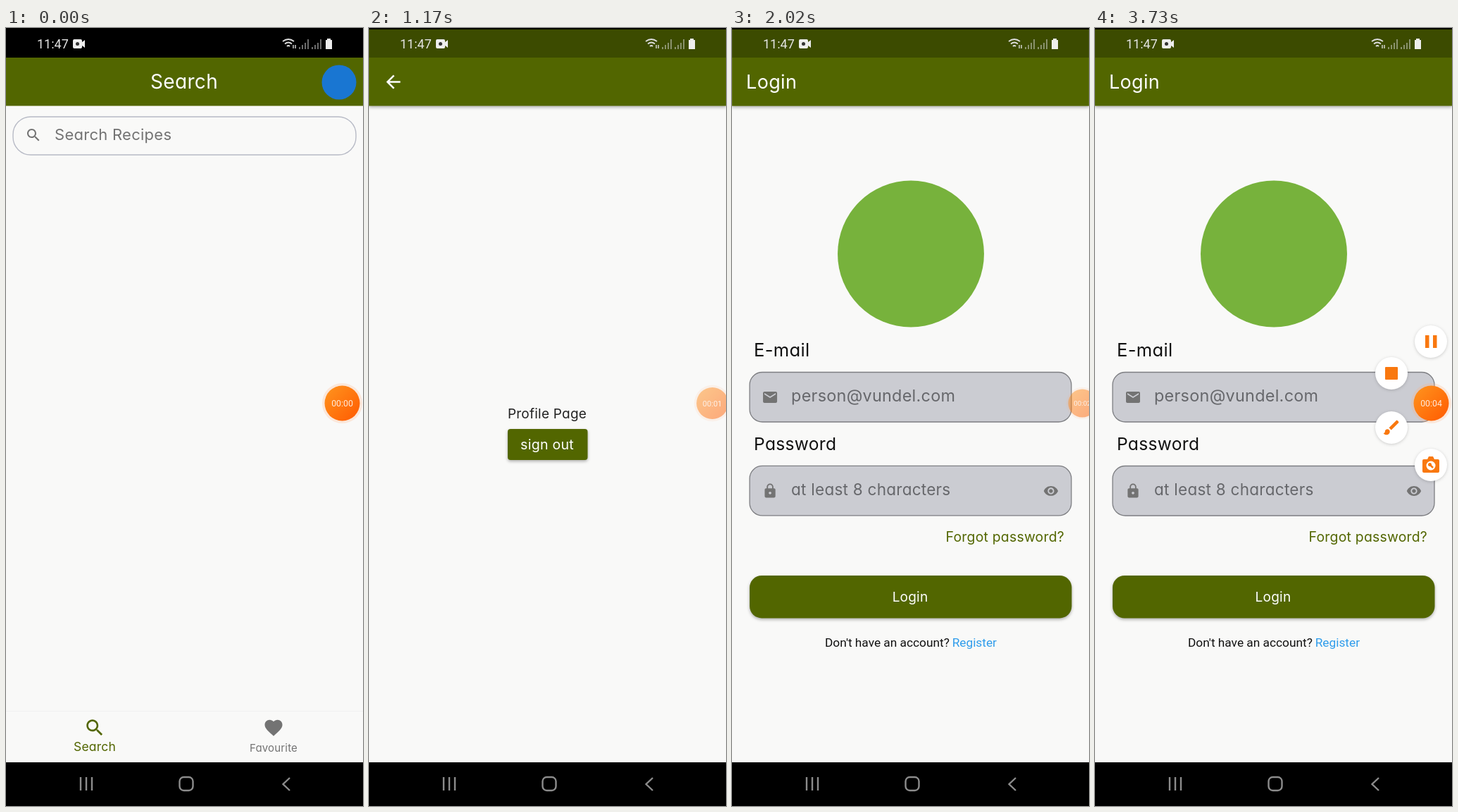
Recreate the animation shown at these times as an HTML page. Size 507 px wide and 1104 px high, loop 3840 ms.

```html
<!DOCTYPE html>
<html lang="en">
<head>
<meta charset="utf-8">
<title>Recipe app sign-out</title>
<style>
html, body { margin: 0; width: 100%; height: 100%; overflow: hidden; background: #000; }
svg { display: block; width: 100vw; height: 100vh; }
text { font-family: Inter, "Open Sans", sans-serif; font-feature-settings: "cv11"; letter-spacing: .012em; }
.sys { font-family: Roboto, Arial, sans-serif; letter-spacing: 0; }
.raised { filter: drop-shadow(0 2px 2px rgba(0, 0, 0, .3)); }
.float { filter: drop-shadow(0 1px 2px rgba(0, 0, 0, .18)); }
</style>
</head>
<body>
<script>
const LOOP = 3840, OLIVE = '#526600', PAGE = '#f9f9f8', GREY = '#737373';
const CX = 253.5, CY = 521;

const PATHS = {
  search: 'M15.5 14h-.79l-.28-.27C15.41 12.59 16 11.11 16 9.5 16 5.91 13.09 3 9.5 3S3 5.91 3 9.5 5.91 16 9.5 16c1.61 0 3.09-.59 4.23-1.57l.27.28v.79l5 4.99L20.49 19l-4.99-5zm-6 0C7.01 14 5 11.99 5 9.5S7.01 5 9.5 5 14 7.01 14 9.5 11.99 14 9.5 14z',
  heart: 'M12 21.35l-1.45-1.32C5.4 15.36 2 12.28 2 8.5 2 5.42 4.42 3 7.5 3c1.74 0 3.41.81 4.5 2.09C13.09 3.81 14.76 3 16.5 3 19.58 3 22 5.42 22 8.5c0 3.78-3.4 6.86-8.55 11.54z',
  mail: 'M20 4H4c-1.1 0-2 .9-2 2v12c0 1.1.9 2 2 2h16c1.1 0 2-.9 2-2V6c0-1.1-.9-2-2-2zm0 4l-8 5-8-5V6l8 5 8-5z',
  lock: 'M18 8h-1V6c0-2.76-2.24-5-5-5S7 3.24 7 6v2H6c-1.1 0-2 .9-2 2v10c0 1.1.9 2 2 2h12c1.1 0 2-.9 2-2V10c0-1.1-.9-2-2-2zm-6 9c-1.1 0-2-.9-2-2s.9-2 2-2 2 .9 2 2-.9 2-2 2zm3.1-9H8.9V6c0-1.71 1.39-3.1 3.1-3.1s3.1 1.39 3.1 3.1z',
  eye: 'M12 4.5C7 4.5 2.73 7.61 1 12c1.73 4.39 6 7.5 11 7.5s9.27-3.11 11-7.5c-1.73-4.39-6-7.5-11-7.5zM12 17c-2.76 0-5-2.24-5-5s2.24-5 5-5 5 2.24 5 5-2.24 5-5 5zm0-8c-1.66 0-3 1.34-3 3s1.34 3 3 3 3-1.34 3-3-1.34-3-3-3z',
  back: 'M20 11H7.83l5.59-5.59L12 4l-8 8 8 8 1.41-1.41L7.83 13H20z',
  brush: 'M7 14c-1.66 0-3 1.34-3 3 0 1.31-1.16 2-2 2 .92 1.22 2.49 2 4 2 2.21 0 4-1.79 4-4 0-1.66-1.34-3-3-3zm13.71-9.37l-1.34-1.34a1 1 0 0 0-1.41 0L9 12.25 11.75 15l8.96-8.96a1 1 0 0 0 0-1.41z'
};

const icon = (name, x, y, size, fill = GREY, extra = '') =>
  `<path d="${PATHS[name]}" fill="${fill}" transform="translate(${x} ${y}) scale(${size}) translate(-12 -12)" ${extra}/>`;
const text = (s, x, y, size, fill, anchor = 'start', extra = '') =>
  `<text x="${x}" y="${y}" font-size="${size}" fill="${fill}" text-anchor="${anchor}" ${extra}>${s}</text>`;
const rect = (x, y, w, h, fill, extra = '') =>
  `<rect x="${x}" y="${y}" width="${w}" height="${h}" fill="${fill}" ${extra}/>`;
const circle = (x, y, r, fill, extra = '') =>
  `<circle cx="${x}" cy="${y}" r="${r}" fill="${fill}" ${extra}/>`;
const header = () => rect(0, 0, 507, 110.5, OLIVE, 'class="raised"');
const field = y => rect(25, y, 457, 70.5, '#cbccd2', 'rx="18" stroke="#7d7e82" stroke-width="1.3"');
const signal = x => `<path d="M${x} 30v-3M${x + 4} 30v-6M${x + 8} 30v-9M${x + 12} 30V16"/>`;

const searchPage = `
  ${rect(0, 0, 507, 1042, PAGE)}
  ${rect(0, 0, 507, 42, '#000')}
  ${rect(0, 42, 507, 68.5, OLIVE)}
  ${rect(447, 42, 60, 68.5, '#fff', 'id="press" opacity=".1"')}
  ${text('Search', 253, 86, 28, '#fff', 'middle')}
  ${circle(473, 77, 24.5, '#1976d2')}
  ${rect(10, 126, 487, 54, PAGE, 'rx="25" stroke="#b8bbc6" stroke-width="1.4"')}
  ${icon('search', 39, 152, 1)}
  ${text('Search Recipes', 69, 159, 22, GREY)}
  ${rect(0, 969, 507, 1, '#f1f1f1')}
  ${icon('search', 126, 993, 1.3, OLIVE)}
  ${text('Search', 126, 1026, 17.5, OLIVE, 'middle')}
  ${icon('heart', 380, 993, 1.25)}
  ${text('Favourite', 380, 1027, 15, GREY, 'middle')}`;

const profilePage = `
  ${rect(0, 0, 507, 1042, PAGE)}
  ${header()}
  ${icon('back', 34.5, 76.5, 1.25, '#fff', 'id="back"')}
  ${text('Profile Page', 253, 554, 19, '#222', 'middle')}
  ${rect(197, 569, 113.5, 44, OLIVE, 'rx="4" class="raised"')}
  <g clip-path="url(#button)">${circle(275, 592, 0, '#fff', 'id="ripple" opacity=".14"')}</g>
  ${text('sign out', 253, 598, 19.6, '#fff', 'middle')}`;

const loginPage = `
  ${rect(0, 0, 507, 1042, PAGE)}
  ${header()}
  ${text('Login', 20, 86, 27, '#fff')}
  ${circle(254, 320.5, 104, '#77b23c')}
  ${text('E-mail', 31, 466, 25.6, '#111')}
  ${field(488.5)}
  ${icon('mail', 54, 524, 1)}
  ${text('person@vundel.com', 84, 530, 23.4, '#66676b')}
  ${text('Password', 31, 599, 24.6, '#111')}
  ${field(621.5)}
  ${icon('lock', 54, 657, .95)}
  ${text('at least 8 characters', 84, 663, 22.5, '#66676b')}
  ${icon('eye', 453, 657, .92)}
  ${text('Forgot password?', 472, 729, 19.4, OLIVE, 'end')}
  ${rect(25, 777, 457.5, 60.5, OLIVE, 'rx="17" class="raised"')}
  ${text('Login', 253, 814, 19, '#fff', 'middle')}
  ${text("Don't have an account?", 132, 878, 17.3, '#111', 'start', 'class="sys"')}
  ${text('Register', 376, 878, 17.3, '#2f9ceb', 'end', 'class="sys"')}`;

const statusBar = `
  ${rect(0, 0, 507, 42, '#000', 'opacity=".27"')}
  ${rect(0, 0, 507, 2, '#000')}
  ${text('11:47', 44, 29, 18, '#e6e6e6', 'start', 'class="sys"')}
  <path d="M97 16h9q2 0 2 2v2l4-3v11l-4-3v2q0 2-2 2h-9q-2 0-2-2v-9q0-2 2-2z" fill="#eee"/>
  ${circle(101.5, 22.5, 2.5, '#333')}
  <g fill="none" stroke="#ddd" stroke-width="1.8">
    <path d="M393 19q8-6 16 0M396 22.5q5-4 10 0M399 26q2-2 4 0"/>
    <path d="M408 24v5M411 24v5" stroke-width="1.4"/>
    <g stroke-width="1.5" opacity=".65">${signal(417)}${signal(435)}</g>
  </g>
  <path d="M456 15h5v2h2v13h-9V17h2z" fill="#eee"/>`;

const navBar = `
  ${rect(0, 1042, 507, 62, '#000')}
  <g fill="none" stroke="#8c8c8c" stroke-width="2.4">
    <path d="M106 1063v19M114 1063v19M122 1063v19M403 1064l-9.500 9 9.500 9"/>
    <rect x="246.500" y="1063" width="19" height="19" rx="6"/>
  </g>`;

// Recorder menu buttons: position and glyph around its own centre
const ORANGE = '#f9780f';
const menu = [
  [477, 445, rect(-8, -9, 5.5, 18, ORANGE) + rect(3, -9, 5.5, 18, ORANGE)],
  [421, 490, rect(-9, -9, 18, 18, ORANGE, 'rx="1"')],
  [421, 567, icon('brush', 0, 0, 1.15, ORANGE)],
  [477, 620, `<path d="M-10-8h5l2-4h6l2 4h5q2 0 2 2V9q0 2-2 2h-20q-2 0-2-2V-6q0-2 2-2z" fill="${ORANGE}"/>
    ${circle(0, 1, 6.5, '#fff')}<path d="M-1 0l4 4" stroke="${ORANGE}" stroke-width="2.500"/>${circle(-1.5, -.5, 2.5, ORANGE)}`]
];

document.body.innerHTML = `<svg viewBox="0 0 507 1104" preserveAspectRatio="none">
  <defs>
    <linearGradient id="fire" x2="1" y2="1"><stop stop-color="#ff951f"/><stop offset="1" stop-color="#ff5a00"/></linearGradient>
    <clipPath id="button"><rect x="197" y="569" width="113.5" height="44" rx="4"/></clipPath>
  </defs>
  <g id="search">${searchPage}</g>
  <g id="profile">${profilePage}</g>
  <g id="login">${loginPage}</g>
  ${statusBar}${navBar}
  ${menu.map(m => `<g class="item">${circle(0, 0, 23, '#fff', 'class="float"')}${m[2]}</g>`).join('')}
  <g id="bubble">
    ${circle(0, 0, 28.5, '#ffb080', 'opacity=".25"')}
    ${circle(0, 0, 25, 'url(#fire)')}
    ${text('00:00', 0, 4.5, 12.3, '#ffe9da', 'middle', 'class="sys" id="clock"')}
  </g>
</svg>`;

const $ = id => document.getElementById(id);
const items = [...document.querySelectorAll('.item')];
const ramp = (t, a, b) => Math.min(1, Math.max(0, (t - a) / (b - a)));
const mix = (a, b, p) => a + (b - a) * p;
const show = (el, on) => el.setAttribute('visibility', on ? 'visible' : 'hidden');

// Two cubic segments: slow start, quick middle, long settle
function zoomCurve(x) {
  const [px, py] = x < 1 / 6
    ? [[0, .05, .1333, .1667], [0, 0, .06, .4]]
    : [[.1667, .2083, .25, 1], [.4, .82, 1, 1]];
  const at = (p, s) => {
    const r = 1 - s;
    return p[0] * r ** 3 + 3 * p[1] * r * r * s + 3 * p[2] * r * s * s + p[3] * s ** 3;
  };
  let lo = 0, hi = 1;
  for (let i = 0; i < 20; i++) {
    const mid = (lo + hi) / 2;
    if (at(px, mid) < x) lo = mid; else hi = mid;
  }
  return at(py, lo);
}

function zoom(el, k) {
  el.setAttribute('transform', `translate(${CX} ${CY}) scale(${k}) translate(${-CX} ${-CY})`);
}

function transition(from, to, t, start, fadeEnd) {
  const x = ramp(t, start, start + 300), p = zoomCurve(x);
  if (x < 1) zoom(from, mix(1, 1.05, p));
  zoom(to, mix(.85, 1, p));
  to.setAttribute('opacity', ramp(x, .125, fadeEnd));
  show(to, x > .125);
  show(from, x < 1);
}

function draw(t) {
  transition($('search'), $('profile'), t, 264, .21);
  if (t >= 1760) transition($('profile'), $('login'), t, 1760, .25);
  else show($('login'), false);
  show($('press'), t >= 110 && t < 564);
  show($('back'), t >= 300 && t < 1760);
  $('ripple').setAttribute('r', 62 * ramp(t, 1640, 1810));

  const awake = t >= 3085;
  const tuck = awake ? 0 : ramp(t, 960, 1380);
  const dim = awake ? 0 : ramp(t, 920, 1150);
  $('bubble').setAttribute('transform', `translate(${mix(477.5, 497.5, tuck)} 532.5) scale(${mix(1, .8, tuck)})`);
  $('bubble').setAttribute('opacity', mix(1, .5, dim));
  $('clock').textContent = '00:0' + Math.floor((t + 440) / 1000);

  const open = ramp(t, 3340, 3500);
  items.forEach((el, i) => {
    const [x, y] = menu[i];
    el.setAttribute('transform', `translate(${mix(477, x, open)} ${mix(532, y, open)}) scale(${open})`);
    show(el, open > 0);
  });
}

const began = performance.now();
function tick() {
  draw((performance.now() - began) % LOOP);
  requestAnimationFrame(tick);
}
tick();
</script>
</body>
</html>
```
